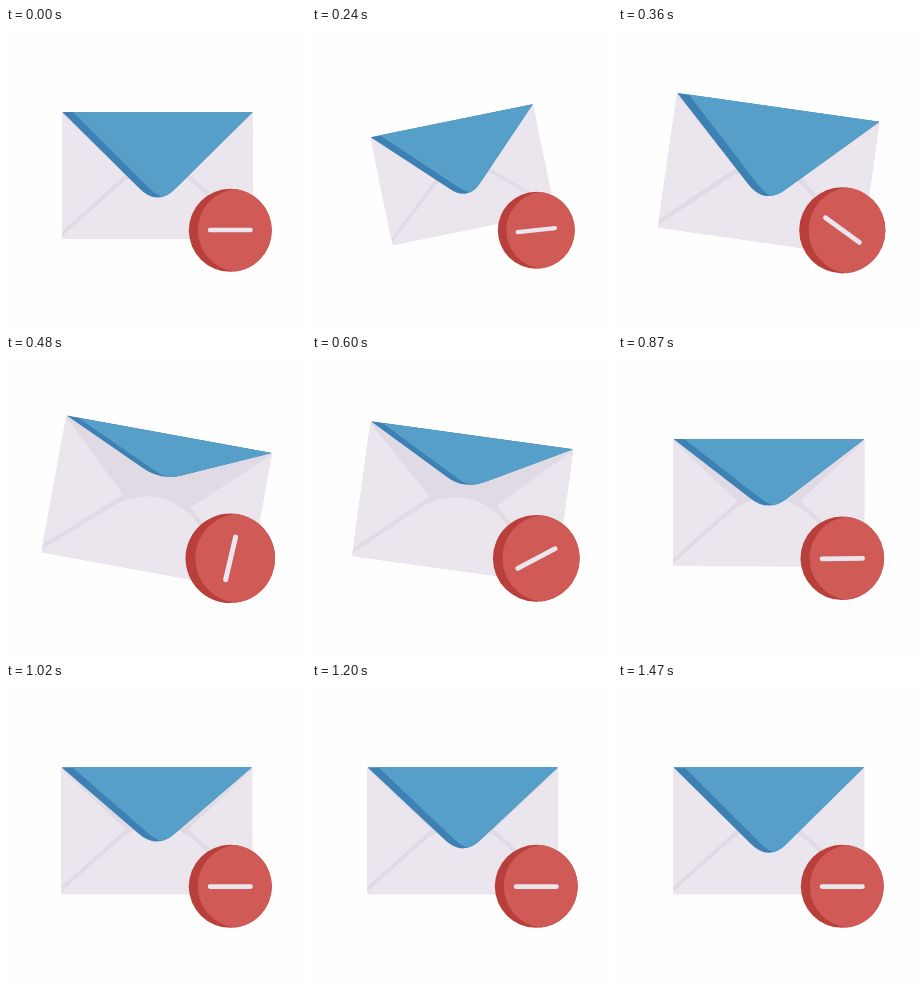
Write an HTML page that moves like this. It is 300x300 px and loops after 1500 ms.

```html
<!DOCTYPE html>
<html lang="en">
<head>
<meta charset="utf-8">
<title>Envelope with minus badge</title>
<style>
  html, body { margin: 0; width: 100%; height: 100%; overflow: hidden; background: #fefefe; }
  svg { display: block; width: 100vw; height: 100vh; }
</style>
</head>
<body>
<svg viewBox="0 0 300 300">
  <!-- envelope, centred on its own origin -->
  <g id="envelope">
    <rect x="-95.5" y="-63.5" width="191" height="127" rx="2" fill="#e0dae4"/>
    <g fill="#ebe6ee">
      <path d="M-95.5 -62L-31.5 -1.5L-95.5 56Z"/>
      <path d="M95.5 -62L31.5 -1.5L95.5 56Z"/>
      <path d="M-95.5 61L-34 6.5Q0 -16.5 34 6.5L95.5 61L94 63.5H-94Z"/>
    </g>
    <g id="flap">
      <path fill="#3c80b4" d="M-95.2 0L-18.5 76Q-9.5 85.5 0 85.5Q9.5 85.5 18.5 76L95.2 0Z"/>
      <path fill="#569fc8" d="M-84.5 0L-8.5 76Q-2.5 82 4.5 85Q12 83 18.5 76L95.2 0Z"/>
    </g>
  </g>
  <g id="badge">
    <circle r="41.5" fill="#b93f3b"/>
    <path fill="#d05a56" d="M4.5 -41.25A41.5 41.5 0 0 1 4.5 41.25A41.5 41.5 0 0 1 4.5 -41.25Z"/>
    <path id="minus" d="M-20.2 -.3H20.2" stroke="#ebe6ee" stroke-width="4.6" stroke-linecap="round"/>
  </g>
</svg>
<script>
const LOOP = 1500;
const [envelope, flap, badge, minus] =
  ['envelope', 'flap', 'badge', 'minus'].map(id => document.getElementById(id));

// Each returns 0 before start and 1 after end.
const progress = (t, start, end) => Math.min(1, Math.max(0, (t - start) / (end - start)));
const smooth = (t, start, end) => (1 - Math.cos(Math.PI * progress(t, start, end))) / 2;
const easeOut = (t, start, end, power) => 1 - (1 - progress(t, start, end)) ** power;

function draw() {
  const t = performance.now() % LOOP;
  const windUp = smooth(t, 0, 210), swing = smooth(t, 210, 400), settle = smooth(t, 450, 900);

  const nudge = -.8 * smooth(t, 0, 60);
  const tilt = -13 * windUp + 23.5 * swing - 10.5 * settle;
  const size = 1 - .148 * windUp + .244 * swing - .096 * settle;
  const fold = 1 - .565 * (smooth(t, 340, 500) - easeOut(t, 500, LOOP, 2));
  const badgeSize = 1 - .08 * windUp + .17 * smooth(t, 210, 450) - .09 * easeOut(t, 450, 1200, 3);
  const turn = 1 - Math.exp(-((Math.max(0, t - 210) / 286) ** 2.07));
  const spin = -8 * windUp + 188 * turn;

  envelope.setAttribute('transform',
    `translate(${151.5 + nudge} ${147.5 + nudge}) rotate(${tilt}) scale(${size})`);
  flap.setAttribute('transform', `translate(0 -63.5) scale(1 ${fold})`);
  badge.setAttribute('transform', `translate(224.3 202.3) scale(${badgeSize})`);
  minus.setAttribute('transform', `rotate(${spin})`);
  requestAnimationFrame(draw);
}
draw();
</script>
</body>
</html>
```
